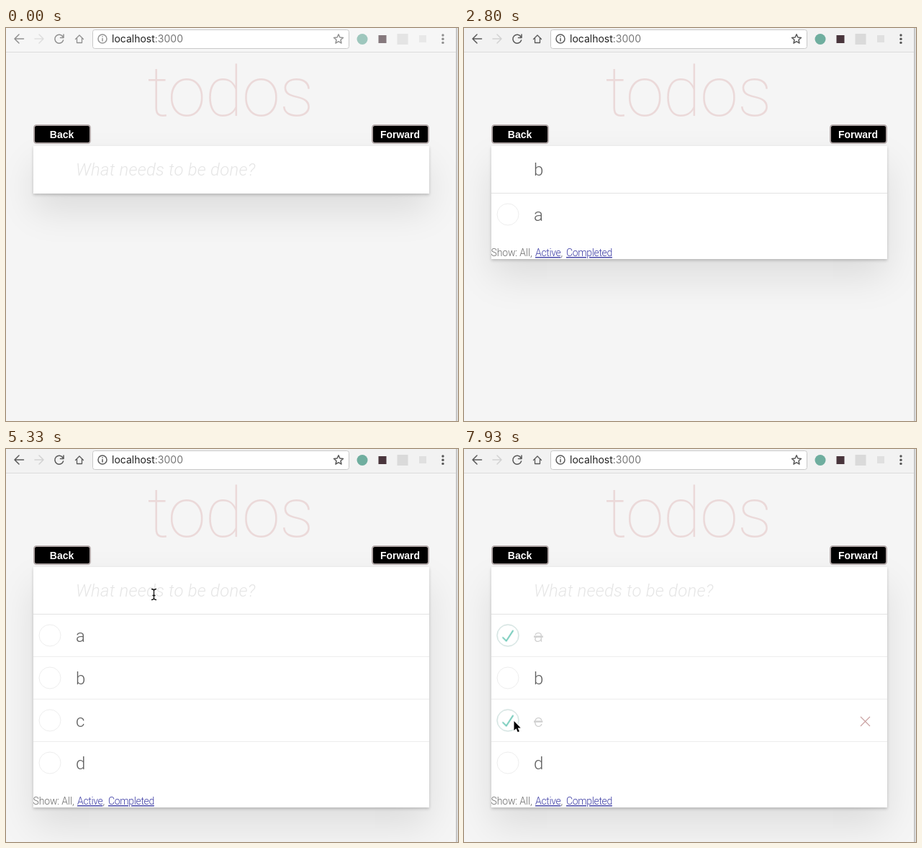
Recreate the animation shown at these times as an HTML page. Size 628 by 546 pixels, loop 8000 ms.

```html
<!DOCTYPE html>
<html lang="en">
<head>
<meta charset="utf-8">
<title>todos</title>
<style>
html, body { margin: 0; width: 100%; height: 100%; overflow: hidden; background: #f5f5f5; }
.stage { position: relative; width: 628px; height: 546px; overflow: hidden; background: #f5f5f5; }
.card {
  position: absolute; left: 38px; top: 164px; width: 550px; height: 66px; background: #fff;
  box-shadow: 0 2px 4px rgba(0,0,0,.2), 0 25px 50px rgba(0,0,0,.1);
}
svg { position: absolute; left: 0; top: 0; display: block; }
text { white-space: pre; }

/* Everything shares one 8 s timeline; 1% is 80 ms. */
.card, .anim { animation: 8s step-end infinite; }
.smooth { animation-timing-function: linear; }

.url { font: 14px Inter, sans-serif; }
.title { font: 100 96px Roboto, sans-serif; letter-spacing: -1px; fill: rgba(175,47,47,.14); text-anchor: middle; }
.button rect { fill: #000; stroke: #b3a9a9; stroke-width: 2; }
.button text { font: bold 14px "Liberation Sans", Arial, sans-serif; fill: #fff; text-anchor: middle; }
.todo { font: 300 24px Roboto, sans-serif; fill: #606060; }
.hint { font-style: italic; letter-spacing: .2px; fill: #e6e6e6; }
.filters { font: 300 14px Roboto, sans-serif; letter-spacing: -.15px; fill: #6a6a6a; }
.filters .link { fill: #3c3ca4; letter-spacing: -.35px; text-decoration: underline; }
.line { fill: none; stroke-linecap: round; stroke-linejoin: round; stroke-width: 1.5; }

.card { animation-name: grow; }
@keyframes grow {
  0% { height: 66px; } 24.125% { height: 157px; } 35.875% { height: 216px; }
  49.125% { height: 275px; } 58.375%, 100% { height: 334px; }
}
.filters { animation-name: filters; }
@keyframes filters {
  0% { opacity: 0; transform: translateY(0); } 24.125% { opacity: 1; transform: translateY(0); }
  35.875% { opacity: 1; transform: translateY(59px); } 49.125% { opacity: 1; transform: translateY(118px); }
  58.375%, 100% { opacity: 1; transform: translateY(177px); }
}

.row-a { animation-name: row-a; } @keyframes row-a { 0% { opacity: 0; } 24.125%, 100% { opacity: 1; } }
.row-b { animation-name: row-b; } @keyframes row-b { 0% { opacity: 0; } 35.875%, 100% { opacity: 1; } }
.row-c { animation-name: row-c; } @keyframes row-c { 0% { opacity: 0; } 49.125%, 100% { opacity: 1; } }
.row-d { animation-name: row-d; } @keyframes row-d { 0% { opacity: 0; } 58.375%, 100% { opacity: 1; } }

.type-a { animation-name: type-a; } @keyframes type-a { 0%, 24.125%, 100% { opacity: 0; } 16.625% { opacity: 1; } }
.type-b { animation-name: type-b; } @keyframes type-b { 0%, 35.875%, 100% { opacity: 0; } 28.375% { opacity: 1; } }
.type-c { animation-name: type-c; } @keyframes type-c { 0%, 49.125%, 100% { opacity: 0; } 41.625% { opacity: 1; } }
.type-d { animation-name: type-d; } @keyframes type-d { 0%, 58.375%, 100% { opacity: 0; } 52.5% { opacity: 1; } }

.hint { animation-name: hint; }
@keyframes hint {
  0%, 24.125%, 35.875%, 49.125%, 58.375%, 100% { opacity: 1; }
  16.625%, 28.375%, 41.625%, 52.5% { opacity: 0; }
}
.caret { animation-name: caret; }
@keyframes caret {
  0%, 23.375%, 35%, 48.375%, 63.375%, 76.625%, 100% { opacity: 0; transform: translateX(0); }
  24.125%, 35.875%, 49.125%, 58.375%, 70.125% { opacity: 1; transform: translateX(0); }
  16.625%, 28.375%, 41.625%, 52.5% { opacity: 1; transform: translateX(12px); }
}

.check-a { animation-name: check-a; } @keyframes check-a { 0% { opacity: 0; } 82.5%, 100% { opacity: 1; } }
.check-c { animation-name: check-c; } @keyframes check-c { 0% { opacity: 0; } 95%, 100% { opacity: 1; } }
.done-a { animation-name: done-a; }
@keyframes done-a {
  0%, 82.49% { fill: #606060; text-decoration: none; }
  82.5% { fill: #606060; text-decoration: line-through; }
  87.5%, 100% { fill: #d0d0d0; text-decoration: line-through; }
}
.done-c { animation-name: done-c; }
@keyframes done-c {
  0%, 94.99% { fill: #606060; text-decoration: none; }
  95% { fill: #606060; text-decoration: line-through; }
  99%, 100% { fill: #d0d0d0; text-decoration: line-through; }
}
.remove { animation-name: remove; }
@keyframes remove {
  0% { opacity: 0; transform: translateY(0); } 71.25% { opacity: 1; transform: translateY(0); }
  87.25% { opacity: 1; transform: translateY(59px); } 89.125%, 100% { opacity: 1; transform: translateY(118px); }
}

.mouse { animation-name: mouse; animation-timing-function: ease-in-out; }
@keyframes mouse {
  0%, 1% { transform: translate(290px, 560px); }
  10.875% { transform: translate(196px, 200px); }
  14.125%, 66.625% { transform: translate(205px, 202px); }
  76.625%, 85% { transform: translate(61px, 263px); }
  91.625%, 100% { transform: translate(69px, 378px); }
}
.arrow { animation-name: arrow; }
@keyframes arrow { 0%, 71.25%, 100% { opacity: 1; } 9.125% { opacity: 0; } }
.beam { animation-name: beam; }
@keyframes beam { 0%, 16.625%, 71.25%, 100% { opacity: 0; } 9.125%, 65.875% { opacity: 1; } }
.ring { animation-name: ring; }
@keyframes ring { 0%, 82.5%, 95%, 100% { opacity: 0; } 80.875%, 93.375% { opacity: 1; } }

.bar { animation-name: bar; } @keyframes bar { 0% { fill: #f6f6f6; } .875%, 100% { fill: #f2f2f2; } }
.tools { animation-name: tools; } @keyframes tools { 0% { opacity: .65; } .875%, 100% { opacity: 1; } }
</style>
</head>
<body>
<div class="stage">
<div class="card"></div>
<svg width="628" height="546" viewBox="0 0 628 546">
  <defs>
    <circle id="box" cx="61" cy="259" r="15" fill="none" stroke="#ededed"/>
    <g id="tick" transform="translate(46 244) scale(.3)">
      <circle cx="50" cy="50" r="50" fill="none" stroke="#bddad5" stroke-width="3"/>
      <path d="M72 25L42 71 27 56l-4 4 20 20 34-52z" fill="#5dc2af"/>
    </g>
    <path id="rule" d="M38 229.5H588" stroke="#ededed"/>
  </defs>

  <!-- browser toolbar -->
  <rect class="anim bar" width="628" height="34"/>
  <path d="M0 33.5H626" stroke="#dcdcdc"/>
  <rect x="120.5" y="2.5" width="356" height="26" rx="3" fill="#fff" stroke="#c9c9c9"/>
  <g class="anim tools">
    <g class="line" stroke="#5a5a5a">
      <path d="M24.5 15H12.5M18 9l-6 6 6 6"/>
      <path d="M40 15H52M46 9l6 6-6 6" stroke="#d2d2d2"/>
      <path d="M79 12a6 6 0 1 0 .6 5M80 9v4.5h-4.5"/>
      <path d="M96.5 15.5l5.5-5.5 5.5 5.5M98.5 14v6.5h7v-6.5" stroke-width="1.3"/>
      <circle cx="134" cy="15" r="6"/>
      <path d="M134 14.5v3.5M134 11.8v.2"/>
      <path d="M462 8.7l1.9 4.3 4.6.4-3.5 3.1 1 4.6-4-2.4-4 2.4 1-4.6-3.5-3.1 4.6-.4z"/>
    </g>
    <g fill="#555">
      <circle cx="607" cy="10" r="1.7"/><circle cx="607" cy="15.2" r="1.7"/><circle cx="607" cy="20.4" r="1.7"/>
    </g>
    <circle cx="495" cy="15.5" r="7.5" fill="#6fae9f"/>
    <rect x="517.5" y="10" width="11" height="11" fill="#49353c"/>
    <rect x="543.5" y="8" width="15" height="15" fill="#dadada"/>
    <rect x="574" y="10" width="10" height="10" fill="#e0e0e0"/>
  </g>
  <text class="url" x="147" y="20.3" fill="#222">localhost<tspan fill="#777">:3000</tspan></text>
  <path d="M626 0V546" stroke="#c6c6c6" stroke-width="2"/>
  <path d="M627.5 0V546" stroke="#e6e6e6"/>

  <!-- page -->
  <text class="title" x="311.5" y="121.5">todos</text>
  <g class="button">
    <rect x="39" y="135" width="78" height="25" rx="3.5"/>
    <text x="77.5" y="153">Back</text>
    <rect x="509" y="135" width="78" height="25" rx="3.5"/>
    <text x="547.5" y="153">Forward</text>
  </g>

  <text class="todo hint anim" x="97" y="205">What needs to be done?</text>
  <text class="todo type-a anim" x="97" y="205">a</text>
  <text class="todo type-b anim" x="97" y="205">b</text>
  <text class="todo type-c anim" x="97" y="205">c</text>
  <text class="todo type-d anim" x="97" y="205">d</text>
  <path class="caret anim" d="M98.5 182V210" stroke="#4d4d4d"/>

  <g class="row-a anim">
    <path d="M38 229.5H588" stroke="#e3e3e3"/>
    <use href="#box"/>
    <text class="todo done-a anim smooth" x="97" y="268">a</text>
    <use href="#tick" class="check-a anim"/>
  </g>
  <g transform="translate(0 59)"><g class="row-b anim">
    <use href="#rule"/><use href="#box"/>
    <text class="todo" x="97" y="268">b</text>
  </g></g>
  <g transform="translate(0 118)"><g class="row-c anim">
    <use href="#rule"/><use href="#box"/>
    <text class="todo done-c anim smooth" x="97" y="268">c</text>
    <use href="#tick" class="check-c anim"/>
  </g></g>
  <g transform="translate(0 177)"><g class="row-d anim">
    <use href="#rule"/><use href="#box"/>
    <text class="todo" x="97" y="268">d</text>
  </g></g>
  <path class="remove anim" d="M551 254l13 13M564 254l-13 13" stroke="#c9a0a0" stroke-width="1.1"/>

  <g class="filters anim">
    <text x="37.5" y="317">Show: All, </text>
    <text x="99" y="317" class="link">Active</text>
    <text x="134.5" y="317">,</text>
    <text x="142" y="317" class="link">Completed</text>
  </g>

  <g class="mouse anim">
    <circle class="ring anim" cy=".5" r="21.5" fill="none" stroke="#111" stroke-width="1.6"/>
    <path class="arrow anim" d="M.5 0V13l3-2.8 2.2 5.1 2.2-1-2.2-4.9h4z" fill="#000" stroke="#fff" stroke-width="1.4" paint-order="stroke"/>
    <g class="beam anim" fill="none">
      <path d="M-3-7.5q3 0 3.5 2 .5-2 3.5-2M-3 7.5q3 0 3.5-2 .5 2 3.5 2M.5-5.5v11M-1.5 1.5h4" stroke="#fff" stroke-width="3"/>
      <path d="M-3-7.5q3 0 3.5 2 .5-2 3.5-2M-3 7.5q3 0 3.5-2 .5 2 3.5 2M.5-5.5v11M-1.5 1.5h4" stroke="#111" stroke-width="1.3"/>
    </g>
  </g>
</svg>
</div>
</body>
</html>
```
